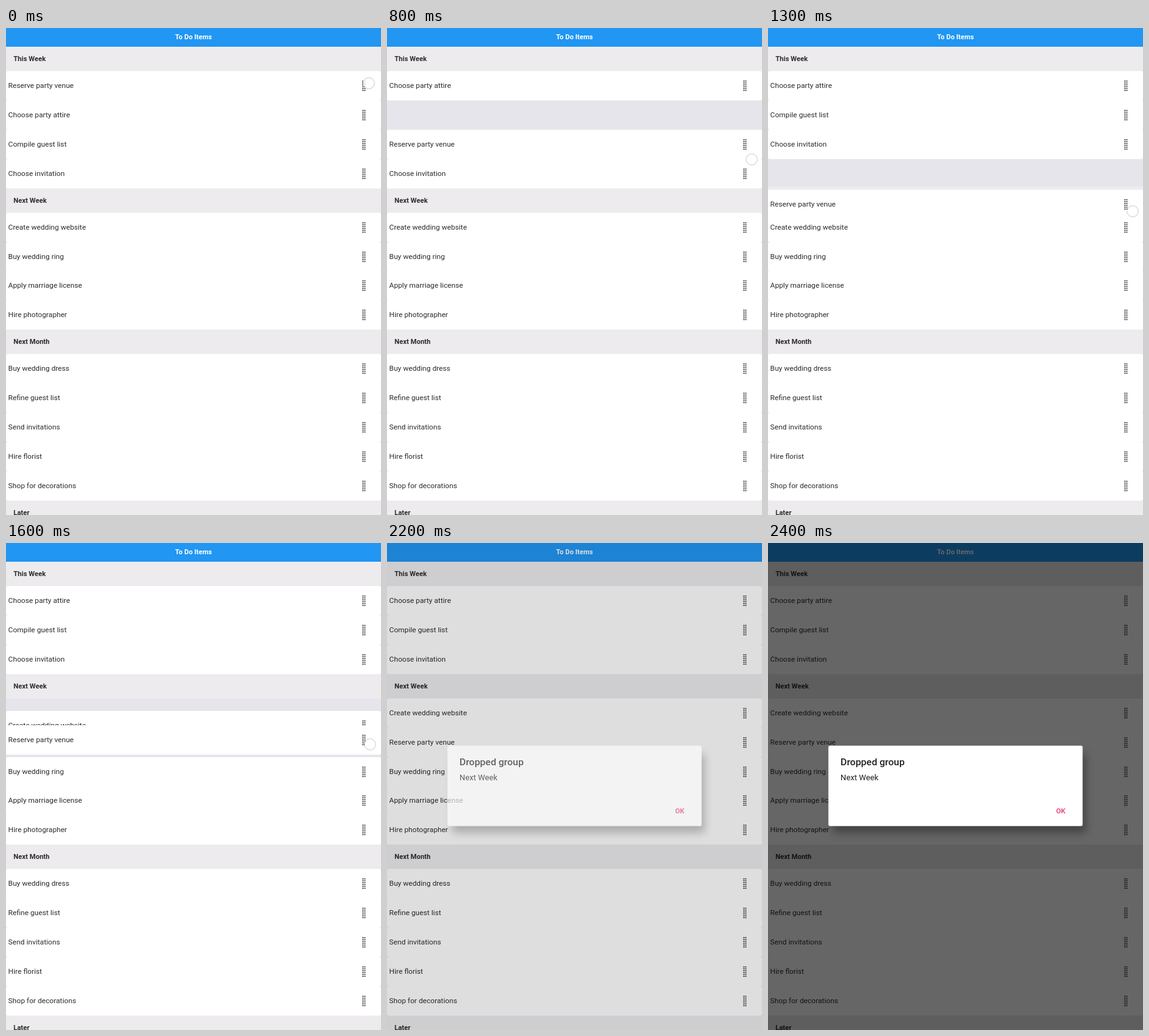
Recreate the animation shown at these times as an HTML page. Size 600 by 780 pixels, loop 2.8 s.

```html
<!DOCTYPE html>
<html lang="en">
<head>
<meta charset="utf-8">
<title>To Do Items</title>
<style>
  html, body { margin: 0; width: 100%; height: 100%; overflow: hidden; }
  body { position: relative; background: #e7e5ec; color: #2c2c2e; font-family: Roboto, Arial, sans-serif; }
  div { position: absolute; box-sizing: border-box; white-space: nowrap; }
  #list, #dim { left: 0; top: 0; width: 600px; height: 780px; overflow: hidden; }
  #list { isolation: isolate; }
  #title { left: 0; top: 0; width: 600px; height: 30px; background: #2196f3; color: #fff; font: bold 11px/30px Roboto, Arial, sans-serif; text-align: center; }
  .head, .row { left: 0; width: 600px; }
  .head { height: 39px; padding-left: 12px; background: #edebee; font-weight: bold; font-size: 11px; line-height: 39px; }
  .row { height: 47.4px; padding-left: 3.6px; background: #fff; border-radius: 3px; font-size: 11.7px; line-height: 46.9px; }
  .row svg { position: absolute; left: 570px; top: 15px; }
  #touch { width: 19px; height: 19px; border: 1px solid #c9c9cb; border-radius: 50%; background: rgba(255, 255, 255, .8); }
  #dim { background: #000; }
  #box { left: 97px; top: 325px; width: 406px; height: 128px; background: #fff; border-radius: 2px; outline: 1px solid rgba(255, 255, 255, .4); color: #212121; box-shadow: 6px 12px 14px -1px rgba(0, 0, 0, .35); }
  #box div { left: 19px; line-height: 20px; }
</style>
</head>
<body>
<div id="list"></div>
<div id="title">To Do Items</div>
<div id="touch"></div>
<div id="dim"></div>
<div id="box">
  <div style="top:16px;font-size:15.5px;font-weight:500">Dropped group</div>
  <div style="top:41px;font-size:12.8px">Next Week</div>
  <div style="top:95px;left:364px;font-size:11.2px;font-weight:bold;color:#ea4c89">OK</div>
</div>
<script>
const ROW = 46.9, HEAD = 39, LOOP = 2800, STEP = 100;
const FIRST_SLIDE = 580, SLIDE_GAP = 232, SLIDE_TIME = 170, DROP = 2200;
const groups = {
  'This Week': ['Reserve party venue', 'Choose party attire', 'Compile guest list', 'Choose invitation'],
  'Next Week': ['Create wedding website', 'Buy wedding ring', 'Apply marriage license', 'Hire photographer'],
  'Next Month': ['Buy wedding dress', 'Refine guest list', 'Send invitations', 'Hire florist', 'Shop for decorations'],
  'Later': []
};

const byId = id => document.getElementById(id);
const list = byId('list'), touch = byId('touch'), dim = byId('dim'), box = byId('box');

// Progress from 0 to 1 between two times
const span = (t, from, to) => Math.min(1, Math.max(0, (t - from) / (to - from)));
const smooth = p => p * p * (3 - 2 * p);
const easeOut = (p, power) => 1 - (1 - p) ** power;

let dots = '';
for (let i = 0; i < 18; i++)
  dots += `<rect x="${i % 3 * 2}" y="${Math.floor(i / 3) * 3}" width="1" height="2"/>`;
const grip = `<svg width="6" height="17" fill="#222">${dots}</svg>`;

const entries = [];
let nextY = 30;
function add(name, kind, height) {
  const el = document.createElement('div');
  el.className = kind;
  el.innerHTML = name + (kind === 'row' ? grip : '');
  list.append(el);
  entries.push({ el, y: nextY });
  nextY += height;
}
for (const [name, items] of Object.entries(groups)) {
  add(name, 'head', HEAD);
  items.forEach(item => add(item, 'row', ROW));
}
const dragged = entries[1], passed = entries.slice(2, 7);
const dropY = passed[4].y;
dragged.el.style.zIndex = 1;

function draw() {
  const t = Math.floor(performance.now() % LOOP / STEP) * STEP;

  for (const e of entries) e.el.style.top = e.y + 'px';
  // Entries passed by the dragged row slide up one after another
  passed.forEach((e, i) => {
    const start = FIRST_SLIDE + i * SLIDE_GAP;
    e.el.style.top = e.y - ROW * smooth(span(t, start, start + SLIDE_TIME)) + 'px';
  });
  const dragY = dragged.y + 243.6 * easeOut(span(t, 465, 2150), 2.2);
  dragged.el.style.top = (t < DROP ? dragY : dropY) + 'px';

  const reach = span(t, 310, 1930);
  touch.style.left = 571 + 3.5 * Math.sin(Math.PI * reach) + 'px';
  touch.style.top = 78.5 + 247 * easeOut(reach, 1.9) + 'px';
  touch.style.opacity = 1 - span(t, 2000, 2150);

  const fade = span(t, 2100, 2400);
  dim.style.opacity = .6 * fade ** 1.4;
  box.style.opacity = easeOut(fade, 2.6);
  requestAnimationFrame(draw);
}
draw();
</script>
</body>
</html>
```
